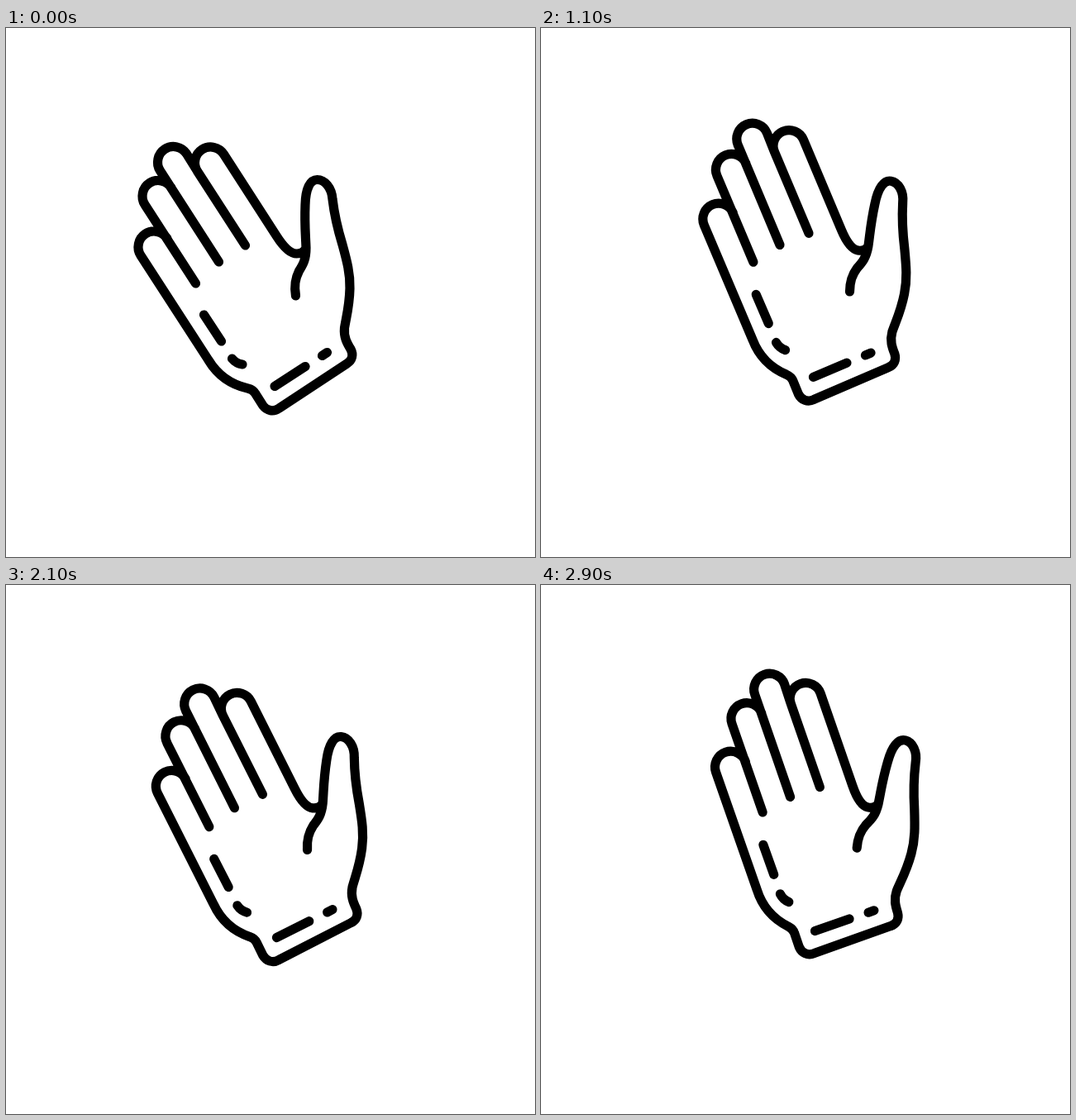
Recreate the animation shown at these times as an HTML page with a canvas. Size 640 px wide and 640 px high, loop 3300 ms.

```html
<!DOCTYPE html>
<html lang="en">
<head>
<meta charset="utf-8">
<title>Waving hand</title>
<style>
  html, body { margin: 0; width: 100%; height: 100%; overflow: hidden; background: #fff; }
  canvas { display: block; }
</style>
</head>
<body>
<canvas id="stage" width="640" height="640"></canvas>
<script>
const ctx = document.getElementById('stage').getContext('2d');
const LOOP = 3300, STEP = 100;
const PIVOT = { x: 390.5, y: 453 };   // on the stage
const WRIST = { x: 391, y: 453 };     // in the drawing
const TILT = 33 * Math.PI / 180;
const RADIUS = 19;

// Swing of the wrist: [step, degrees from the drawn pose].
const SWING = [
  [0, 0], [2, 11.6], [3, 9.5], [5, -3.4], [6, -7], [7, -4.2],
  [10, 13.7], [11, 10], [15, -9.1], [16, -2.75], [18, 7.6],
  [19, 11.7], [20, 11.2], [21, 6.15], [24, -9.1], [28, 10], [29, 13.7]
];

const hand = new Path2D(
  // crease, thumb, cuff and outer edge of the palm
  'M351 324 C349 312 350 304 355 294 C360 286 363.5 280 363.5 266' +
  'C363 250 361.5 238 362.5 214 C363 194 368.5 183.5 377 183.5' +
  'C386 183.5 394.5 193 395.5 207 C398 228 402 244 407.5 262' +
  'C413 282 417 297 416.5 315 C416 337 412 350 410 363' +
  'C409 374 413 381 417.5 388.5 C421 395 419.5 402 413 406' +
  'L331 460 C324 465 316 463 311.5 457 L302 442' +
  'C300 438.5 297 437 293 436 C273 431.5 257 421 245.3 401.5 L163.6 275.4' +
  // web between index finger and thumb
  'M263.9 152.6 L328 252 C337 266 345 273 352 273 C357 273 361 271 363 267' +
  // accents
  'M240 347 L261 379 M274 400 Q279 406 286.5 407' +
  'M325.5 433.5 L362.5 409.5 M383 396.5 L389 392.5'
);

function addFinger(x, y, endX, endY) {
  const dx = RADIUS * Math.cos(TILT), dy = RADIUS * Math.sin(TILT);
  hand.moveTo(x - dx, y + dy);
  hand.arc(x, y, RADIUS, Math.PI - TILT, 2 * Math.PI - TILT);
  if (endX) {
    hand.moveTo(x - dx, y + dy);
    hand.lineTo(endX, endY);
  }
}
addFinger(179.5, 265);
addFinger(184.5, 203.5, 230, 309);
addFinger(203, 162.5, 258, 283);
addFinger(248, 163, 290, 263);
hand.moveTo(218.9, 152.1);
hand.lineTo(232.1, 173.4);

function angleAt(step) {
  const i = SWING.findIndex(key => key[0] >= step);
  if (i < 0) return SWING[SWING.length - 1][1];
  if (i === 0) return SWING[0][1];
  const [s0, a0] = SWING[i - 1], [s1, a1] = SWING[i];
  return a0 + (a1 - a0) * (step - s0) / (s1 - s0);
}

function draw(time) {
  const step = Math.floor((time % LOOP) / STEP);
  ctx.setTransform(1, 0, 0, 1, 0, 0);
  ctx.fillStyle = '#fff';
  ctx.fillRect(0, 0, 640, 640);
  ctx.translate(PIVOT.x, PIVOT.y);
  ctx.rotate(angleAt(step) * Math.PI / 180);
  ctx.translate(-WRIST.x, -WRIST.y);
  ctx.strokeStyle = '#000';
  ctx.lineWidth = 11.2;
  ctx.lineCap = ctx.lineJoin = 'round';
  ctx.stroke(hand);
}

const start = performance.now();
function tick() {
  draw(performance.now() - start);
  requestAnimationFrame(tick);
}
tick();
</script>
</body>
</html>
```
